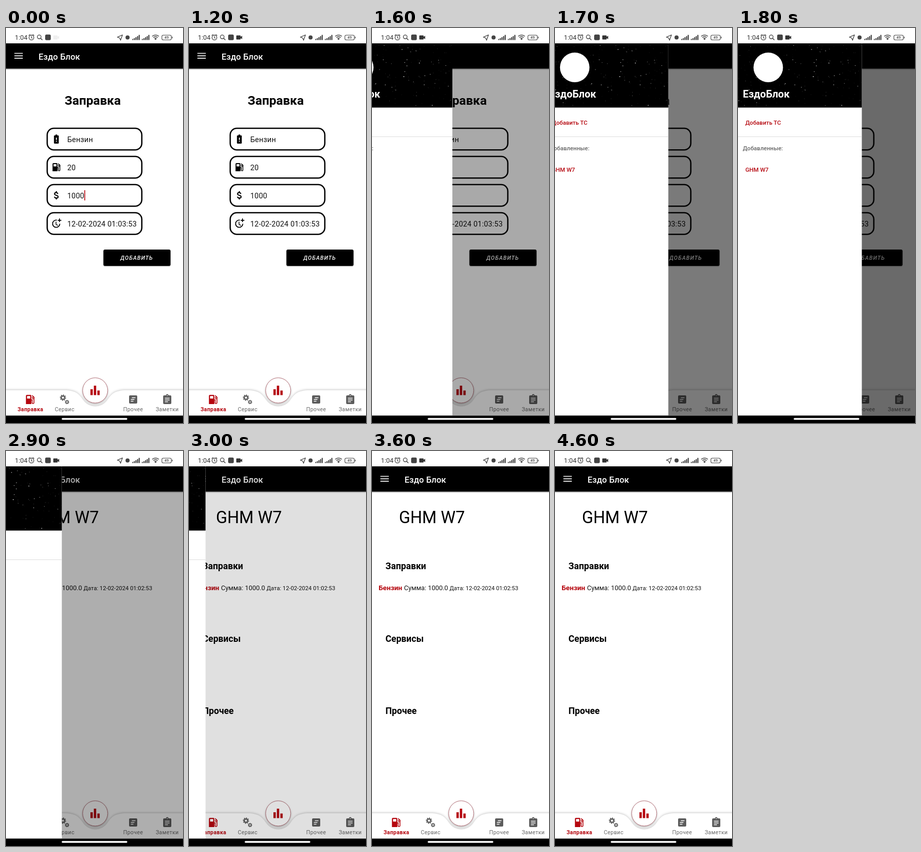
An HTML page that plays this animation: 348x772 px, repeating every 5 s.

```html
<!DOCTYPE html>
<html lang="ru">
<head>
<meta charset="utf-8">
<title>Заправка</title>
<style>
html, body { margin: 0; width: 100%; height: 100%; overflow: hidden; background: #fff; }
svg { display: block; width: 100vw; height: 100vh; }
text { font-family: Roboto, sans-serif; white-space: pre; }
.b { font-weight: 700; }
.m { font-weight: 500; }
.red { fill: #b5060e; }
.mid { text-anchor: middle; }
.nav { font-size: 10.6px; letter-spacing: .4px; fill: #666; }
.nav.red { fill: #b5060e; }
.line { fill: none; stroke: currentColor; }
.field { fill: #fff; stroke: #000; stroke-width: 2.6; }
.value { font-size: 14.5px; letter-spacing: .2px; fill: #111; }
#bar { filter: drop-shadow(0 -1px 2px rgba(0,0,0,.22)); }
#fab { filter: drop-shadow(0 2px 2px rgba(0,0,0,.3)); }
</style>
</head>
<body>
<svg viewBox="0 0 348 772" preserveAspectRatio="none">
  <defs>
    <linearGradient id="fade" x2="0" y2="1">
      <stop stop-color="#000" stop-opacity=".28"/>
      <stop offset="1" stop-color="#000" stop-opacity="0"/>
    </linearGradient>
    <clipPath id="view"><rect y="30" width="348" height="727.5"/></clipPath>
    <g id="fuel">
      <path fill="currentColor" fill-rule="evenodd" d="M5.5 3H12.5a2 2 0 0 1 2 2V21H3.5V5a2 2 0 0 1 2-2zM5.8 5.2v5h6.4v-5z"/>
      <path class="line" stroke-width="1.6" d="M14 12.8h2.2v5.4a1.8 1.8 0 0 0 3.6 0V7.6L16 4"/>
      <circle class="line" stroke-width="1.5" cx="18.2" cy="9" r="1.7"/>
    </g>
    <g id="battery">
      <path fill="currentColor" d="M10 2h4v2h2a1.3 1.3 0 0 1 1.3 1.3V20.700a1.300 1.300 0 0 1-1.300 1.300H8a1.300 1.300 0 0 1-1.300-1.300V5.300A1.300 1.300 0 0 1 8 4h2z"/>
      <path stroke="#fff" stroke-width="2" d="M12 9v5M12 16v2"/>
    </g>
    <g id="money" class="line" stroke-width="2.2">
      <path d="M15.200 9C15 7 13.700 6 11.700 6 9.300 6 7.900 7.200 7.900 8.800 7.900 10.700 9.600 11.300 11.900 11.900 14.600 12.600 16 13.500 16 15.300 16 17 14.500 18 12 18 9.400 18 8 16.800 7.800 15"/>
      <path stroke-width="2.800" d="M11.900 3v3M11.900 18v3"/>
    </g>
    <g id="clock" class="line" stroke-width="2">
      <path d="M13 4.700A8 8 0 1 0 19.600 12.500"/>
      <path stroke-width="1.600" d="M11.300 8v6l4 2.300"/>
      <path d="M15 5h8M19 1v8"/>
    </g>
    <g id="gear" class="line">
      <circle r="3.400" stroke-width="2.800"/>
      <circle r="5.200" stroke-width="2" pathLength="16" stroke-dasharray="1"/>
    </g>
    <g id="signal" fill="#444"></g>
  </defs>

  <rect width="348" height="772" fill="#fff"/>

  <g id="formPage">
    <text class="b mid" x="170.500" y="150" font-size="24.600">Заправка</text>
    <g id="fields"></g>
    <rect id="cursor" x="154" y="317" width="1.600" height="20" class="red"/>
    <rect x="191.500" y="434" width="132" height="32.500" rx="3" fill="#000" opacity=".2"/>
    <rect x="191.500" y="433" width="132" height="32" rx="3"/>
    <text class="m" x="225" y="453" font-size="10.800" font-style="italic" letter-spacing="1.100" fill="#fff">ДОБАВИТЬ</text>
  </g>

  <g id="carPage">
    <text x="53" y="140.500" font-size="32.700">GHM W7</text>
    <g class="b" font-size="17.700">
      <text x="26.500" y="231">Заправки</text>
      <text x="26.500" y="373">Сервисы</text>
      <text x="26.500" y="514">Прочее</text>
    </g>
    <text class="b red" x="13" y="272" font-size="13.700">Бензин</text>
    <text x="63" y="272" font-size="12.900" fill="#111">Сумма: 1000.0</text>
    <text x="152.500" y="272" font-size="11.300" fill="#111">Дата: 12-02-2024 01:02:53</text>
  </g>

  <rect y="30" width="348" height="49.500"/>
  <rect y="79.500" width="348" height="3" fill="url(#fade)"/>
  <path stroke="#fff" stroke-width="1.700" d="M16.500 49.500h16.500M16.500 54.300h16.500M16.500 59.100h16.500"/>
  <text class="m" x="64" y="61.500" font-size="16.700" letter-spacing=".100" fill="#fff">Ездо Блок</text>

  <path id="bar" fill="#fff" d="M-5 708H114C138 708 144 716 151 726C163 744 188 744 200 726C207 716 213 708 237 708H353V762H-5Z"/>
  <circle id="fab" cx="175.300" cy="708.300" r="24.600" fill="#fff"/>
  <circle cx="175.300" cy="708.300" r="24.600" fill="none" stroke="#a4505a" stroke-width=".8"/>
  <path class="red" d="M166 706h4.600v11.500h-4.600zM172.700 699h4.600v18.500h-4.600zM179.600 708.500h4.600v9h-4.600z"/>
  <use href="#fuel" transform="translate(35.800 714) scale(.97 1)" color="#b5060e"/>
  <g color="#666">
    <use href="#gear" x="112" y="722.500"/>
    <use href="#gear" transform="translate(120 731) scale(.7)"/>
  </g>
  <g fill="#5c5c5c">
    <rect x="242" y="718" width="16" height="16" rx="2"/>
    <rect x="309" y="718" width="16" height="17" rx="2"/>
    <circle cx="317" cy="718" r="2.500"/>
  </g>
  <path stroke="#fff" stroke-width="1.600" d="M247.500 722.500h7M245.500 726h7M245.500 729.500h5M312.500 723.500h9M312.500 727h9M312.500 730.500h6"/>
  <circle cx="317" cy="718.300" r=".9" fill="#fff"/>
  <g id="labels"></g>

  <g clip-path="url(#view)">
    <rect id="scrim" y="30" width="348" height="728"/>
    <g id="drawer">
      <rect y="30" width="248" height="728" fill="#fff"/>
      <rect y="30" width="248" height="125.500"/>
      <g id="specks" fill="#fff"></g>
      <circle cx="64" cy="77" r="29" fill="#fff"/>
      <text class="b" x="14" y="135.500" font-size="20" fill="#fff">ЕздоБлок</text>
      <rect y="212" width="248" height="1" fill="#dcdcdc"/>
      <g class="m" font-size="11.500">
        <text class="red" x="19" y="188.500">Добавить ТС</text>
        <text x="14" y="239" fill="#666">Добавленные:</text>
        <text class="red" x="19" y="281">GHM W7</text>
      </g>
    </g>
  </g>

  <rect y="757.500" width="348" height="15"/>
  <rect x="109.500" y="762.300" width="129" height="3.400" rx="1.700" fill="#fff"/>

  <rect width="348" height="30" fill="#fff"/>
  <text x="17.500" y="23" font-size="12.800" fill="#333">1:04</text>
  <g class="line" color="#444" stroke-width="1.300">
    <circle cx="50" cy="18.700" r="4.700"/>
    <path d="M50 16v3l2 1.200M44.600 15l3-2.500M55.400 15l-3-2.500"/>
    <circle cx="65.300" cy="17.300" r="3.700"/>
    <path stroke-width="1.600" d="M68 20l3.500 3.500"/>
    <path stroke-linejoin="round" d="M229 13.500l-10 4.300 4.500 1.700 1.700 4.500z"/>
    <rect x="306.500" y="14" width="18.500" height="9.200" rx="2.800" stroke-width="1.100"/>
    <path d="M326.800 17v3.200"/>
    <path d="M287.500 16.300a9.300 9.300 0 0 1 13 0M289.800 18.800a6 6 0 0 1 8.400 0" stroke-width="1.500"/>
  </g>
  <rect x="77" y="12.800" width="11" height="11" rx="2.500" fill="#444"/>
  <path id="camera" fill="#333" d="M94 14.500h6.500a1 1 0 0 1 1 1v1.800l3-2v6.400l-3-2v1.800a1 1 0 0 1-1 1H94a1 1 0 0 1-1-1v-6a1 1 0 0 1 1-1z"/>
  <circle cx="239" cy="18.500" r="4" fill="#444"/>
  <use href="#signal" x="248"/>
  <use href="#signal" x="267"/>
  <path fill="#444" d="M291.500 20.800a3.600 3.600 0 0 1 5 0L294 23.500z"/>
  <text class="m mid" x="315.800" y="21.400" font-size="7.500" fill="#444">49</text>
</svg>
<script>
const LOOP = 5000, STEP = 100, WIDTH = 248, SETTLE = 545;
const el = id => document.getElementById(id);

el('fields').innerHTML = [
  ['battery', 'Бензин'], ['fuel', '20'], ['money', '1000'], ['clock', '12-02-2024 01:03:53']
].map(([icon, value], i) => `<g transform="translate(0 ${i * 55})">
  <rect class="field" x="81" y="196" width="186" height="42.200" rx="13"/>
  <use href="#${icon}" transform="translate(88.400 206.400) scale(.886)" color="#000"/>
  <text class="value" x="120.500" y="222.500">${value}</text></g>`).join('');

el('labels').innerHTML = [
  [48, 'Заправка', 'b red'], [115.300, 'Сервис', ''], [250, 'Прочее', ''], [317, 'Заметки', '']
].map(([x, name, style]) => `<text class="nav mid ${style}" x="${x}" y="749">${name}</text>`).join('');

el('signal').innerHTML = [2, 3.500, 5.500, 7.500, 10]
  .map((h, i) => `<rect x="${i * 3.200}" y="${23.500 - h}" width="2.200" height="${h}"/>`).join('');

let seed = 41;
const rand = () => (seed = seed * 16807 % 2147483647) / 2147483647;
el('specks').innerHTML = Array.from({ length: 210 }, () => {
  const x = rand() * 246 + 1, y = rand() * 123 + 31, r = .25 + rand() ** 3 * .75;
  return `<circle cx="${x}" cy="${y}" r="${r}" opacity="${.2 + rand() * .55}"/>`;
}).join('');

// Fraction still to travel while the drawer settles.
const rest = age => Math.max(0, 1 - Math.max(0, age) / SETTLE) ** 5;
const show = (id, on) => el(id).setAttribute('visibility', on ? 'visible' : 'hidden');

function draw(t) {
  const closing = t >= 2900;
  const open = closing ? rest(t - 2818) : 1 - rest(t - 1500);
  el('drawer').setAttribute('transform', `translate(${(open - 1) * WIDTH} 0)`);
  show('drawer', open > 0);
  // The dimming trails the panel by a little.
  const dim = closing ? .6 * Math.min(1, open ** .78) : .6 * open ** 1.280;
  el('scrim').setAttribute('opacity', dim);
  show('formPage', t < 2500);
  show('carPage', t >= 2500);
  show('cursor', t < 2500 && (t + 300) % 1000 < 500);
  el('camera').setAttribute('opacity', Math.min(1, .08 + t / 300));
}

const start = performance.now();
function tick() {
  const t = (performance.now() - start) % LOOP;
  draw(Math.floor(t / STEP) * STEP);
  requestAnimationFrame(tick);
}
tick();
</script>
</body>
</html>
```
